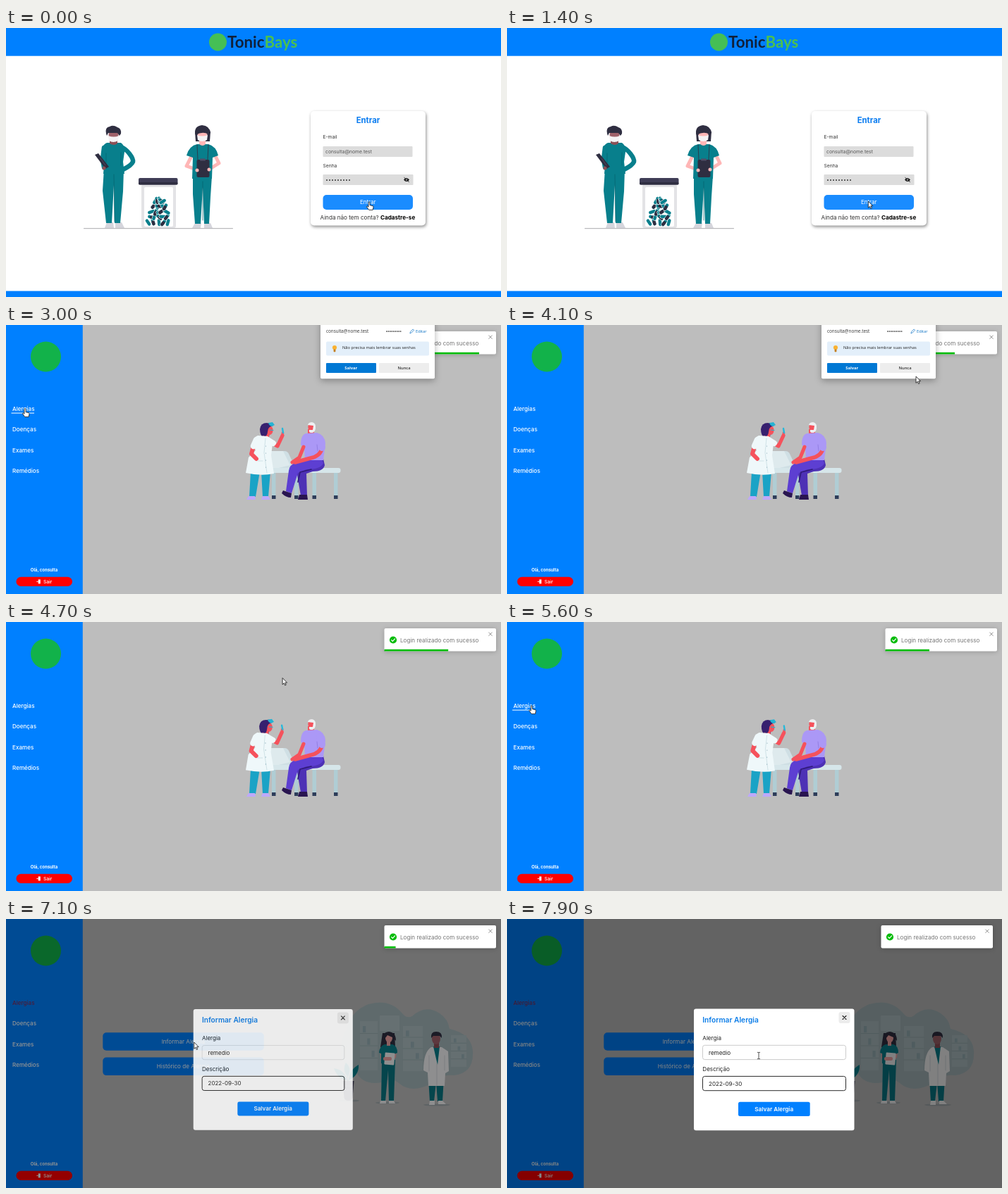
Write an HTML page that moves like this. It is 702 px wide and 382 px high and loops after 8000 ms.

```html
<!DOCTYPE html>
<html lang="pt">
<head>
<meta charset="utf-8">
<title>Painel do paciente</title>
<style>
html, body { margin: 0; width: 100%; height: 100%; overflow: hidden; background: #fff; }
svg { display: block; width: 100vw; height: 100vh; font-family: Inter, sans-serif; }
.mid { text-anchor: middle; }
.pop { font-family: "Open Sans", sans-serif; }
.line { fill: none; stroke-linecap: round; stroke-linejoin: round; }
#card { filter: drop-shadow(1px 2px 2px rgba(0,0,0,.45)); }
#popup { filter: drop-shadow(0 3px 5px rgba(0,0,0,.3)); }
#toast { filter: drop-shadow(0 1px 3px rgba(0,0,0,.2)); }
</style>
</head>
<body>
<svg id="stage" viewBox="0 0 702 382" preserveAspectRatio="none"></svg>
<script>
const LOOP = 8000, STEP = 100;
const BLUE = '#0080ff', TEAL = '#087f8c', INK = '#2f2e41', GREEN = '#07bc0c';
const MAIL = 'consulta@nome.test';

const rect = (x, y, w, h, fill, r = 0, more = '') =>
  `<rect x="${x}" y="${y}" width="${w}" height="${h}" rx="${r}" fill="${fill}" ${more}/>`;
const text = (x, y, size, fill, s, more = '') =>
  `<text x="${x}" y="${y}" font-size="${size}" fill="${fill}" ${more}>${s}</text>`;
const mid = (x, y, size, fill, s, weight = 400) =>
  text(x, y, size, fill, s, `class="mid" font-weight="${weight}"`);
const shape = (d, fill, more = '') => `<path d="${d}" fill="${fill}" ${more}/>`;
const line = (d, color, w, more = '') =>
  `<path class="line" d="${d}" stroke="${color}" stroke-width="${w}" ${more}/>`;
const disc = (x, y, rx, fill, ry = rx) =>
  `<ellipse cx="${x}" cy="${y}" rx="${rx}" ry="${ry}" fill="${fill}"/>`;
const group = (id, ...parts) => `<g id="${id}">${parts.join('')}</g>`;
const cross = (x, y, r, color, w) =>
  line(`M${x - r} ${y - r}l${2 * r} ${2 * r}m0 ${-2 * r}l${-2 * r} ${2 * r}`, color, w);
const dots = (x, y, gap, r, fill) =>
  Array.from({ length: 9 }, (_, i) => disc(x + i * gap, y, r, fill)).join('');

function pills() {
  let seed = 11, out = '';
  const rnd = () => (seed = (seed * 16807) % 2147483647) / 2147483647;
  for (let i = 0; i < 25; i++) {
    const row = Math.floor(i / 5), spread = 31 - row * 4.5;
    const x = 217 - spread / 2 + spread * ((i % 5) + rnd() * .5) / 4.5;
    const y = 277 - row * 7.6 - rnd() * 2, a = rnd() * Math.PI;
    const dx = Math.cos(a) * 3, dy = Math.sin(a) * 3;
    const whole = `M${x - dx} ${y - dy}L${x + dx} ${y + dy}`;
    out += line(whole, '#fff', 5.6) + line(whole, TEAL, 4.4);
    if (i % 2) out += line(`M${x} ${y}l${dx} ${dy}`, INK, 4.4);
  }
  return out;
}

const leftNurse = () => [
  shape('M143 276h9l1 8h-13zM155 276h9l4 8h-13z', '#d5d5dc'),
  shape('M139 200h28l-1 32-4 45h-8l-1-54-3 54h-8l-5-46z', TEAL),
  line('M153 208l1 67', '#05616c', .7),
  line('M163 169C172 172 181 185 180 190Q178 195 166 201', TEAL, 6.5),
  shape('M143 163h20q6 4 5 13l-2 14 2 17h-30l2-18-3-16q0-8 6-10z', TEAL),
  line('M139 170l-2 16 2 12', TEAL, 6.5),
  line('M163 177v18M142 178v18', '#05616c', .6),
  shape('M147 156h11v8q-5 4-11 0z', '#8b5157'),
  disc(152.5, 152, 7, '#9f616a', 8),
  shape('M142 150q-2-9 5-10 5-3 11 1 6 2 5 9l-2 3-3-4h-13l-2 4z', INK),
  shape('M145 153q8 3 15 0l-1 7q-7 4-13 0z', '#f5f3f5'),
  shape('M126 180l5-2 15 19-5 3z', INK),
  line('M134 185l7 10', '#5a5870', .7),
  disc(139, 199, 2.5, '#8b5157')
].join('');

const rightNurse = () => [
  shape('M268 277h9l-1 7h-12zM281 277h9l3 7h-12z', '#d5d5dc'),
  shape('M265 210h27l-2 30-2 38h-7l-2-52-3 52h-8l-3-42z', TEAL),
  line('M279 218v55', '#05616c', .7),
  line('M265 178l-9 18 17 6M295 178l7 14-16 10', '#ffb6b6', 5),
  shape('M271 165h16q11 3 14 16l-8 3-1 30h-28l1-30-9-3q4-14 15-16z', TEAL),
  shape('M268 147h22l-1 14h-20z', INK),
  shape('M274 157h9v8q-4 4-9 0z', '#ffb6b6'),
  disc(278.5, 151, 7, '#ffb6b6', 8),
  shape('M268 150q-1-11 10-12 11 1 12 11l-3 2q-8-5-18 1z', INK),
  shape('M271 152q7 3 15 0l-1 7q-7 4-13 0z', '#f5f3f5'),
  line('M271 166l1 21M287 166l-1 21', INK, .8),
  rect(270.5, 187, 18, 25, INK, 2),
  rect(275, 185.5, 8, 3, '#504e67', 1),
  disc(271, 202, 2.5, '#ffb6b6'), disc(288, 201, 2.5, '#ffb6b6')
].join('');

const jar = () => [
  rect(192, 222, 49, 62, '#e3e3e6', 3),
  rect(196, 226, 41, 56, '#fff', 2),
  pills(),
  rect(188, 213, 55.5, 9.5, '#3f3d56', 2),
  rect(188, 219, 55.5, 3.5, INK, 1.5)
].join('');

const login = group('login',
  rect(0, 0, 702, 382, '#fff'),
  rect(0, 0, 702, 39.7, BLUE), rect(0, 373.5, 702, 9, BLUE),
  disc(300.5, 20, 12.5, '#45bf55'),
  text(314, 28, 22.3, '#10203a', 'Tonic<tspan fill="#4cc04f">Bays</tspan>',
    'font-weight="700" font-family="Lato, sans-serif"'),
  line('M110.5 284.7h211', '#a9a9ad', 1),
  leftNurse(), jar(), rightNurse(),
  group('card', rect(432, 118, 163, 162.5, '#fff', 5)),
  mid(513.5, 135, 11.3, '#0a7cf0', 'Entrar', 700),
  text(449.5, 157, 6.7, '#333', 'E-mail'),
  rect(449.5, 168, 127, 15, '#dcdcdc', 1),
  text(453, 178, 6.8, '#555', MAIL),
  text(449.5, 197.5, 6.7, '#333', 'Senha'),
  rect(449.5, 208, 128, 15, '#dcdcdc', 1),
  dots(455, 216, 4, 1, '#333'),
  shape('M564 215.5q4-5 8 0-4 5-8 0z', '#111'),
  disc(568, 215.5, 1.2, '#dcdcdc'),
  line('M564.8 212.5l6.6 6', '#111', .9),
  rect(449.5, 237, 127.5, 21, '#1a8cff', 5),
  mid(513.3, 250.3, 8, '#fff', 'Entrar'),
  text(445.5, 271.8, 8.15, '#333',
    'Ainda não tem conta? <tspan fill="#000" font-weight="700">Cadastre-se</tspan>')
);

const SKIN = '#f5525c', WHITE = '#eff8fa';
const bench = [
  ...[377, 409, 434.5, 465].map(x =>
    rect(x, 209, 5.5, 33, '#b0cdd4') + rect(x, 242, 5.5, 5, '#2d3d5a')),
  shape('M373 179h22q4 0 6 4l9 19-30 5z', '#cfdfe4'),
  shape('M373 179h20l10 20-25 6z', '#deeaed'),
  rect(371, 203, 103.5, 7, '#d6e6ea', 3)
].join('');

const doctorLegs = [
  shape('M347 208h13l-6 36h-9zM362 208h13l-3 36h-8z', '#1aa3c6'),
  shape('M344 243h9l1 5h-13zM364 243h8l3 5h-13z', '#bda9fa')
].join('');

const doctorBody = [
  shape('M370 139q-9 0-10 9 0 8 5 13l8-2 2-13z', '#37206f'),
  disc(374, 149.5, 4.6, SKIN, 6.4),
  shape('M367 152l6 2v8l-9-3z', SKIN),
  shape('M363 154q-3-14 10-15 7 0 6 4-8 1-8 9-1 7-5 6z', '#37206f'),
  shape('M372 139l6-1 3 4-4 2q-4-1-5-5z', '#24b3d3'),
  line('M374 149l5 .5', '#24b3d3', 1.2),
  line('M374 166l11 6 7-15', SKIN, 5.2),
  line('M392 158l.5-5', SKIN, 3.5),
  line('M393 153l-1-6', '#27b9da', 2.4),
  shape('M357 157l14 1q6 4 7 11l-2 16 4 26q-18 4-40-1l4-22 10-10-4-8q1-11 7-13z', WHITE),
  line('M371 163l8 5', WHITE, 8),
  line('M351 172l-3 11 7 7', SKIN, 6),
  line('M355 163l-4 9', WHITE, 8.5),
  line('M368 161l-2 20 4 29M357 193h7', '#c7dce2', .8),
  [172, 182, 192, 202].map(y => disc(368.5, y, .6, '#7fa4b3')).join('')
].join('');

const patient = [
  shape('M450 190l2 9q-2 9-17 9l-9 3 1 32-9-1-6-35 12-12z', '#4d31b5'),
  shape('M447 189l3 7q-3 9-24 9l-12 5-9 29-8-3 4-29q1-9 11-12l16-6z', '#5d3fd2'),
  line('M433 205l-16 4-3 14', '#2f1a78', 1.6),
  shape('M393 235l12 4-1 6q-7 0-13-6zM416 241h11l1 7h-14z', '#291550'),
  shape('M428 148h9v9h-9z', SKIN),
  disc(433, 145, 4.6, SKIN, 6.5),
  shape('M428 142q1-4 6-4 6 1 5 9-1 6-6 6-4 0-3-4h5l1-6z', '#edf0f2'),
  shape('M425 154l16-1q11 3 12 15l-3 24h-26l-1-17-5-5q0-14 7-16z', '#ab98f6'),
  line('M448 175q-2 11-16 14l-22 6', SKIN, 5.5),
  line('M422 173l-6 15-10 7', SKIN, 5),
  line('M445 163l3 11', '#ab98f6', 10),
  line('M441 170l1 9', '#8974da', .7)
].join('');

const home = group('home', bench, doctorLegs, group('doctor', doctorBody), patient);

const CLOUD = '#a4b6ba';
const shelf = (x, y, w, h) => rect(x, y, w, h, '#aebfc2') +
  [.25, .5, .75].map(k => line(`M${x} ${y + h * k}h${w}`, '#95a9ae', .8)).join('') +
  [.1, .35, .6].map((k, i) => rect(x + 4 + i * w / 4, y + h * k, w / 6, h * .13, '#97b0b6')).join('');

const clinic = [
  shape('M476 190q-2-18 7-34 6-25 31-35 30-9 48 13 6 8 14 4 19-17 39-4 12 8 14 22 31 7 33 31 2 32-27 35-20-2-31 11-28 16-47 0-10-9-24-1-26 5-36-14-20-5-21-28z', CLOUD),
  shelf(502, 145, 25, 70), shelf(563, 152, 28, 64), shelf(631, 165, 22, 45),
  rect(530, 137, 28, 22, '#b0c1c4', 1),
  disc(486, 258, 15, '#a2aaad', 1.6), disc(541, 261, 17, '#a2aaad', 1.6), disc(611, 264, 19, '#a2aaad', 1.6),
  line('M485 231q-2-9 0-20M485 230q-8-5-13-14M485 230q6-7 10-13', '#176a70', 1),
  shape('M485 224q-9-8-3-20 9 8 3 20zM484 229q-14-2-19-17 15 2 19 17zM486 229q0-14 14-22 1 15-14 22z', TEAL),
  shape('M477.5 230h16l-2 24q-1 4-6 4t-6-4z', '#33324d'),
  line('M479 237h13M479.5 243h12', '#58566d', .7),
  shape('M533 200h19l-2 59h-7l-1-45-4 45h-6z', '#087783'),
  shape('M531 258h8v4h-9zM543 258h7l2 4h-9z', '#f1f1f3'),
  shape('M534 162h17l1 20h-21z', INK),
  line('M533 188l0 9 9 2M552 188l-1 8-8 3', '#f1a5a5', 4),
  shape('M537 178h11q7 2 7 12l-4 2v13h-19v-14l-3-1q1-10 8-12z', TEAL),
  shape('M540 174h5v6h-5z', '#f1a5a5'),
  disc(543, 169, 5, '#f1a5a5', 6.5),
  shape('M534 174q-2-13 9-14 10 1 10 13l-5-5-7-3z', INK),
  rect(537, 190, 14, 17, '#f5f5f6', 1, 'transform="rotate(5 544 198)"'),
  rect(535, 196, 12, 5, '#f1a5a5', 2),
  shape('M599 225h22l-2 34h-7l-2-27-3 27h-6z', '#087783'),
  shape('M601 258h7v6h-8zM613 258h6l5 5h-11z', '#f4f4f5'),
  shape('M603 182h15l9 6 1 28-5 3-1 18h-23l-1-19-6-3q0-26 11-33z', '#f4f4f5'),
  shape('M606 181h9l-3 26z', TEAL),
  line('M611 206v30M600 194v22M622 194v21', '#cdd3d7', .8),
  shape('M607 176h7v7h-7z', '#8d4f56'),
  disc(610, 170, 6, '#9f616a', 8),
  shape('M603 169q-1-9 7-9 9 0 8 9l-3-3h-9z', INK)
].join('');

const wide = (id, y, label, fill) =>
  rect(137.3, y, 228.5, 25.5, fill, 5, `id="${id}"`) + mid(251.3, y + 15.4, 8.1, '#fff', label);

const allergy = group('allergy', clinic,
  wide('inform', 161.2, 'Informar Alergia', BLUE),
  wide('history', 196.6, 'Histórico de Alergia', BLUE));

const sidebar = [
  rect(0, 0, 108.8, 382, BLUE),
  disc(56.5, 45, 21.5, '#12b24a'),
  ...['Alergias', 'Doenças', 'Exames', 'Remédios'].map((s, i) =>
    text(9, 121.9 + i * 29.45, 8.1, '#fff', s, `id="nav${i}" font-weight="500"`)),
  rect(7.5, 124.6, 32.5, 1, '#fff', 0, 'id="under"'),
  mid(54, 350.2, 6, '#fff', 'Olá, consulta', 700),
  rect(14.5, 357.8, 79.5, 13.2, '#f00', 6.6),
  rect(45.8, 361.4, 3, 6, '#fff'), line('M43.8 364.4h1.6', '#fff', 1),
  text(53, 366.9, 6.7, '#fff', 'Sair', 'font-weight="500"')
].join('');

const toast = group('toast',
  rect(536.5, 9, 158.5, 32.5, '#fff', 2),
  disc(549, 25.5, 5.1, GREEN),
  line('M546.6 25.6l1.7 1.8 3.2-3.6', '#fff', 1.2),
  text(559, 28.8, 8.1, '#757575', 'Login realizado com sucesso'),
  cross(687, 17.2, 2.3, '#888', .9),
  rect(536.5, 38.8, 158.5, 2.7, GREEN, 0, 'id="bar"'));

const popup = `<g id="popup" class="pop">` + [
  rect(446, -10, 162, 86.3, '#fff', 2),
  text(454, 11, 6.3, '#333', MAIL),
  dots(540, 9, 2.45, .85, '#222'),
  line('M573 11.5l.6-2 3.6-3.6 1.4 1.4-3.6 3.6z', '#0b72c4', .7),
  text(581, 11, 5.7, '#0b72c4', 'Editar'),
  rect(454, 23.5, 146, 20, '#e3effa', 2),
  disc(466, 32, 3.1, '#f9b233'), rect(464.6, 34.6, 2.8, 3.6, '#c47f22', .6),
  text(477, 34, 5.8, '#222', 'Não precisa mais lembrar suas senhas'),
  rect(454, 54, 71, 14, '#0078d4', 1), mid(489.3, 63.2, 5.8, '#fff', 'Salvar', 700),
  rect(529, 54, 71, 14, '#ededed', 1, 'id="never"'), mid(564.5, 63.2, 5.8, '#333', 'Nunca', 600)
].join('') + '</g>';

const field = (id, y, border, value) =>
  rect(277.5, y, 203, 20.3, '#fff', 3, `id="${id}" stroke="${border}"`) + text(286, y + 13.2, 8.05, '#222', value);

const modal = group('modal',
  rect(265, 127.5, 227.5, 172.7, '#fff', 3),
  text(277.3, 146.6, 10.2, '#0a7ce8', 'Informar Alergia', 'font-weight="600"'),
  rect(470.5, 132, 16, 16, '#ececec', 3),
  cross(478.5, 140, 2.5, '#222', 1.1),
  text(277.3, 172, 8.1, '#222', 'Alergia'),
  field('what', 179.3, '#e2e2e2', 'remedio'),
  text(277.3, 216, 8.1, '#222', 'Descrição'),
  field('when', 223.4, '#2a2a2a', '2022-09-30'),
  rect(328, 259.7, 101.7, 20.3, BLUE, 2.5),
  mid(378.7, 272.8, 8.2, '#fff', 'Salvar Alergia', 600));

const cursors = {
  arrow: shape('M0 0v9.3l2.2-2 1.4 3.2 1.5-.7-1.4-3.1h2.8z', '#fff', 'stroke="#111" stroke-width=".8"'),
  hand: shape('M-1 .4Q0-1.2 1 .4v4.2l4.2 1.1q1 .4.8 1.6L5.2 11.4H-.3L-3.4 7.2q-.3-1.4 1-1.2L-1 7.2z',
    '#fff', 'stroke="#111" stroke-width=".8" stroke-linejoin="round"'),
  beam: line('M-1.6-4.6h1.1l.5.5.5-.5h1.1M0-4v8M-1.6 4.6h1.1l.5-.5.5.5h1.1', '#222', .8)
};

const $ = id => document.getElementById(id);
$('stage').innerHTML = login + group('panel',
  rect(0, 0, 702, 382, '#bdbdbd'), home, allergy, sidebar,
  rect(0, 0, 702, 382, '#000', 0, 'id="shade"'), modal, toast, popup) +
  group('pointer', ...Object.entries(cursors).map(([k, v]) => group(k, v)));

const clamp = v => Math.max(0, Math.min(1, v));
const ramp = (t, a, b) => clamp((t - a) / (b - a));
const linear = p => p, smooth = p => p * p * (3 - 2 * p), out = p => 1 - (1 - p) ** 3;

// Interpolates keys of the form [time, value].
function track(t, keys, ease = linear) {
  let i = 0;
  while (i < keys.length - 2 && t >= keys[i + 1][0]) i++;
  const [a, u] = keys[i], [b, v] = keys[i + 1];
  return u + (v - u) * ease(ramp(t, a, b));
}

const PATH = [[0, 515, 247], [1300, 515, 247], [1400, 512.3, 246], [1900, 512.3, 246], [2700, 27, 119],
  [3350, 27, 119], [4100, 580, 73], [4250, 568, 60], [4450, 568, 60], [5100, 35, 119], [6000, 35, 119],
  [6500, 205, 190], [6800, 250, 170], [7000, 250, 170], [7400, 357, 202], [7500, 357, 202], [7900, 357, 194]];
const PATH_X = PATH.map(k => [k[0], k[1]]), PATH_Y = PATH.map(k => [k[0], k[2]]);
const BAR = [[2240, 695], [3000, 671], [3300, 664], [4100, 635], [4450, 635], [5600, 599],
  [6000, 588], [6900, 559], [7400, 543], [7600, 543], [7700, 536.5]];
const SLIDE = [[1600, 1500], [2020, -13], [2125, 5], [2230, -3], [2300, 0], [7800, 0], [7900, -6]];

const set = (id, attrs) => {
  for (const k in attrs) $(id).setAttribute(k, attrs[k]);
};
const show = (id, on) => set(id, { display: on ? 'inline' : 'none' });

function draw(t) {
  const inside = t >= 1600, onAllergy = t >= 5900;
  show('login', !inside);
  show('panel', inside);
  show('home', !onAllergy);
  show('allergy', onAllergy);

  const lean = -9 * (1 - smooth(ramp(t, 1600, 2400)));
  const sway = t > 2400 ? .8 * Math.sin((t - 3000) * Math.PI / 1100) : 0;
  set('doctor', { transform: `translate(0 ${lean / 2}) rotate(${lean + sway} 362 212)` });

  const under = t < 4500 ? ramp(t, 2600, 2800) * (1 - ramp(t, 3350, 3500))
    : ramp(t, 5050, 5250) * (1 - ramp(t, 6050, 6150));
  set('under', { width: 32.5 * under });
  set('nav0', { fill: t >= 6100 ? '#80305f' : '#fff' });
  set('inform', { fill: t >= 6600 && t < 7100 ? '#268cf2' : BLUE });

  const fade = ramp(t, 1450, 1750) ** .4 * (1 - ramp(t, 4400, 4650));
  const grow = .96 + .04 * out(ramp(t, 1530, 1800));
  set('popup', { opacity: fade, transform: `translate(527 0) scale(${grow}) translate(-527 0)` });
  set('never', { fill: t >= 4200 && t < 4600 ? '#dedede' : '#ededed' });

  set('toast', { transform: `translate(${track(t, SLIDE, out)} 0)` });
  set('bar', { width: track(t, BAR) - 536.5 });

  const open = out(ramp(t, 6950, 7250));
  set('shade', { opacity: .48 * open });
  set('modal', { opacity: open,
    transform: `translate(379 214) scale(${.95 + .05 * open}) translate(-379 -214)` });
  set('what', { stroke: t >= 7600 ? '#cbcbcb' : '#e2e2e2' });

  const hand = t < 1400 || (t >= 2600 && t < 3400) || (t >= 5000 && t < 6050);
  const kind = hand ? 'hand' : t >= 7600 ? 'beam' : 'arrow';
  for (const k in cursors) show(k, k === kind);
  set('pointer', { transform: `translate(${track(t, PATH_X, smooth)} ${track(t, PATH_Y, smooth)})` });
}

function tick() {
  draw(Math.floor(performance.now() % LOOP / STEP) * STEP);
  requestAnimationFrame(tick);
}
tick();
</script>
</body>
</html>
```
